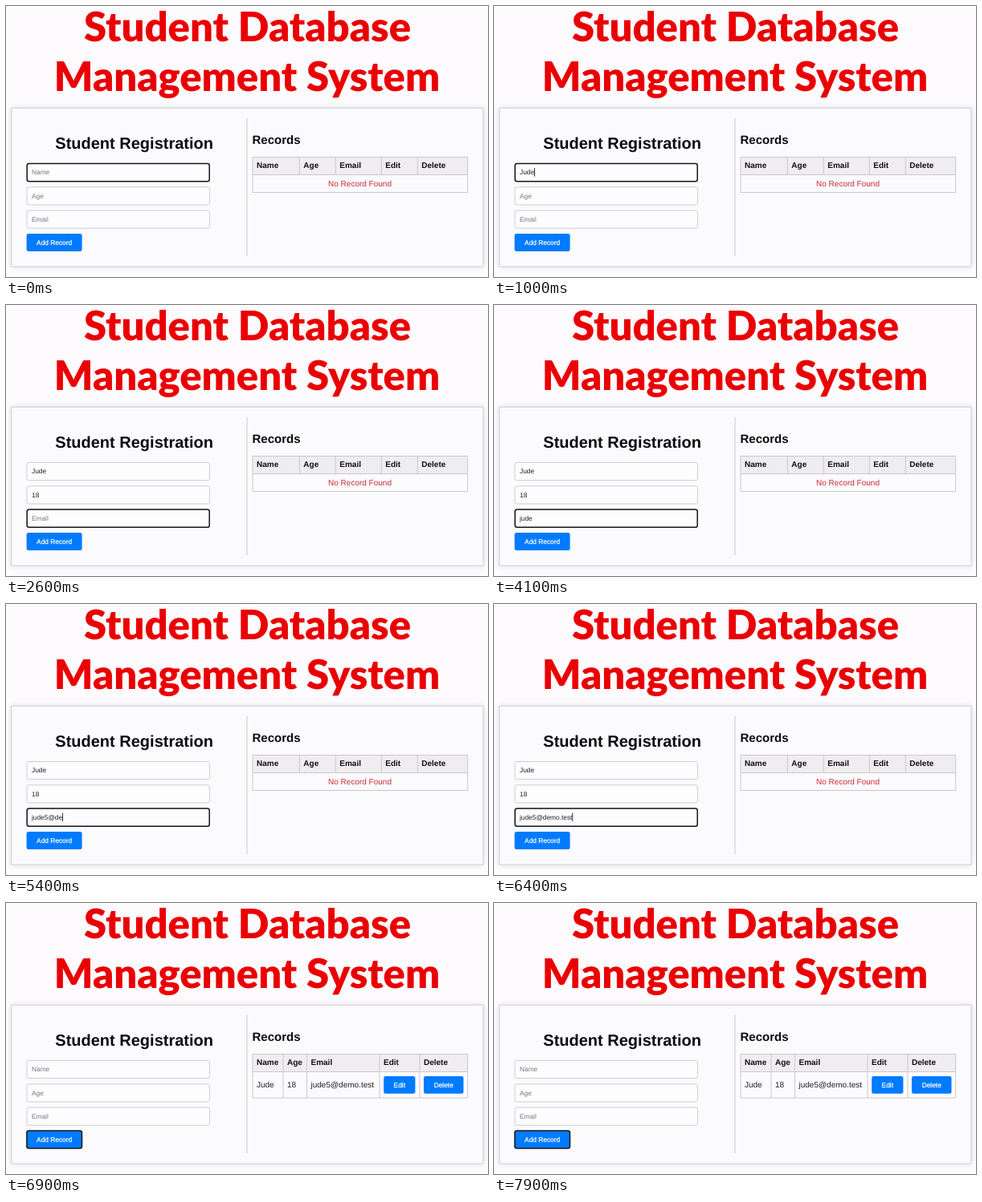
An HTML page for the animation above (8000 ms loop, 600 by 338 pixels).

```html
<!DOCTYPE html>
<html lang="en">
<head>
<meta charset="utf-8">
<title>Student Database Management System</title>
<style>
  html, body { margin: 0; width: 100%; height: 100%; overflow: hidden; background: #fdfbfe; }
  svg { display: block; width: 100%; height: 100%; }
  text { font: 10px "Liberation Sans", Arial, sans-serif; fill: #222; text-rendering: geometricPrecision; }
  .title { font: 900 50.8px Lato, sans-serif; fill: #ea0003; text-anchor: middle; }
  .heading { font-size: 20px; font-weight: bold; fill: #0c0a10; }
  .subheading { font-size: 15px; font-weight: bold; fill: #0c0a10; }
  .head { font-weight: bold; fill: #111; }
  .empty { fill: #cb2a35; text-anchor: middle; }
  .input { font-size: 8.33px; }
  .placeholder { fill: #77777b; }
  .label { font-size: 8.33px; fill: #fff; stroke: #fff; stroke-width: 0.25; text-anchor: middle; }
  .button { fill: #007bff; }
  .line { fill: none; stroke: #cbc9cc; }
  .field { fill: #fdfcfe; stroke: #cfcdd0; }
  .focus { fill: none; stroke: #18181c; stroke-width: 1.5; }
  .card { fill: #fbfafd; stroke: #d3d1d5; filter: drop-shadow(0 0 3px #0002); }
  .headRow { fill: #efedef; }
</style>
</head>
<body>
<svg id="stage" viewBox="0 0 600 338"></svg>
<script>
const LOOP = 8000, BLINK = 500, SUBMIT = 6600;
const NAME = "Jude", AGE = "18", EMAIL = "jude5@demo.test";
const COLUMNS = ["Name", "Age", "Email", "Edit", "Delete"];

const fields = [
  { hint: "Name", y: 196.5, value: NAME, focusAt: -BLINK, keys: [300, 500, 800, 900] },
  { hint: "Age", y: 225.8, value: AGE, focusAt: 1300, keys: [1600, 1800] },
  { hint: "Email", y: 255, value: EMAIL, focusAt: 2000,
    keys: [2800, 3000, 3300, 3500, 4500, 4900, ...Array.from({ length: 9 }, (_, i) => 5300 + i * 90)] },
];

const text = (x, y, cls, content, id = "") =>
  `<text x="${x}" y="${y}" class="${cls}" id="${id}">${content}</text>`;
const rect = (x, y, w, h, cls, r = 0, id = "") =>
  `<rect x="${x}" y="${y}" width="${w}" height="${h}" rx="${r}" class="${cls}" id="${id}"/>`;
const button = (x, y, w, h, label) =>
  rect(x, y, w, h, "button", 2.5) + text(x + w / 2, y + h / 2 + 2.8, "label", label);

// Column edges run from the left of the table to its right.
function table(id, edges, bottom, dividersEnd, body) {
  const dividers = edges.slice(1, -1).map(x => `M${x} 188.5V${dividersEnd}`).join("");
  return `<g id="${id}">` +
    rect(307, 188.5, 267.7, 22, "headRow") +
    `<path class="line" d="M307 188.5H574.7V${bottom}H307ZM307 210.5H574.7${dividers}"/>` +
    COLUMNS.map((name, i) => text(edges[i] + 5, 202.4, "head", name)).join("") + body + "</g>";
}

const stage = document.getElementById("stage");
stage.innerHTML =
  text(300.5, 44, "title", "Student Database") +
  text(300, 106, "title", "Management System") +
  rect(6.8, 127.3, 587.2, 197.7, "card") +
  '<path class="line" d="M300 140V312"/>' +
  text(61.3, 177.6, "heading", "Student Registration") +
  text(306.5, 172, "subheading", "Records") +
  fields.map((f, i) => rect(26, f.y, 227.5, 22.2, "field", 2.2) +
    text(32, f.y + 13.7, "input", "", "input" + i)).join("") +
  button(25.6, 284, 69, 22, "Add Record") +
  table("emptyTable", [307, 365.3, 410.3, 467.3, 512.3, 575], 232.5, 210.5,
    text(440.5, 224.6, "empty", "No Record Found")) +
  table("filledTable", [307, 345, 374.5, 465, 515, 575], 243, 243,
    text(312, 230.3, "", NAME) + text(350, 230.3, "", AGE) + text(379.5, 230.3, "", EMAIL) +
    button(470.2, 216, 39.2, 21.7, "Edit") + button(520, 216, 49.5, 21.7, "Delete")) +
  rect(26.2, 196, 227, 22.3, "focus", 2.5, "ring") +
  rect(32, 202, 0.8, 10.5, "", 0, "caret");

const byId = id => document.getElementById(id);
const show = (id, visible) => byId(id).setAttribute("display", visible ? "inline" : "none");
const place = (id, attrs) => {
  for (const key in attrs) byId(id).setAttribute(key, attrs[key]);
};

function render(t) {
  const submitted = t >= SUBMIT;
  const active = fields.findLastIndex(f => t >= f.focusAt);

  fields.forEach((f, i) => {
    const typed = submitted ? "" : f.value.slice(0, f.keys.filter(k => t >= k).length);
    const input = byId("input" + i);
    input.textContent = typed || f.hint;
    input.setAttribute("class", typed ? "input" : "input placeholder");

    if (i === active && !submitted) {
      const lastEvent = Math.max(f.focusAt, ...f.keys.filter(k => t >= k));
      const width = typed ? input.getComputedTextLength() : 0;
      place("ring", { x: 26.2, y: f.y, width: 227, height: 22.3 });
      place("caret", { x: 32 + width, y: f.y + 5.6 });
      const blinkOn = Math.floor((t - lastEvent) / BLINK) % 2 === 0;
      show("caret", blinkOn && lastEvent >= 0);
    }
  });

  if (submitted) {
    place("ring", { x: 25.9, y: 284, width: 68.6, height: 22 });
    show("caret", false);
  }
  show("emptyTable", !submitted);
  show("filledTable", submitted);
}

const start = performance.now();
function tick() {
  render((performance.now() - start) % LOOP);
  requestAnimationFrame(tick);
}
tick();
</script>
</body>
</html>
```
